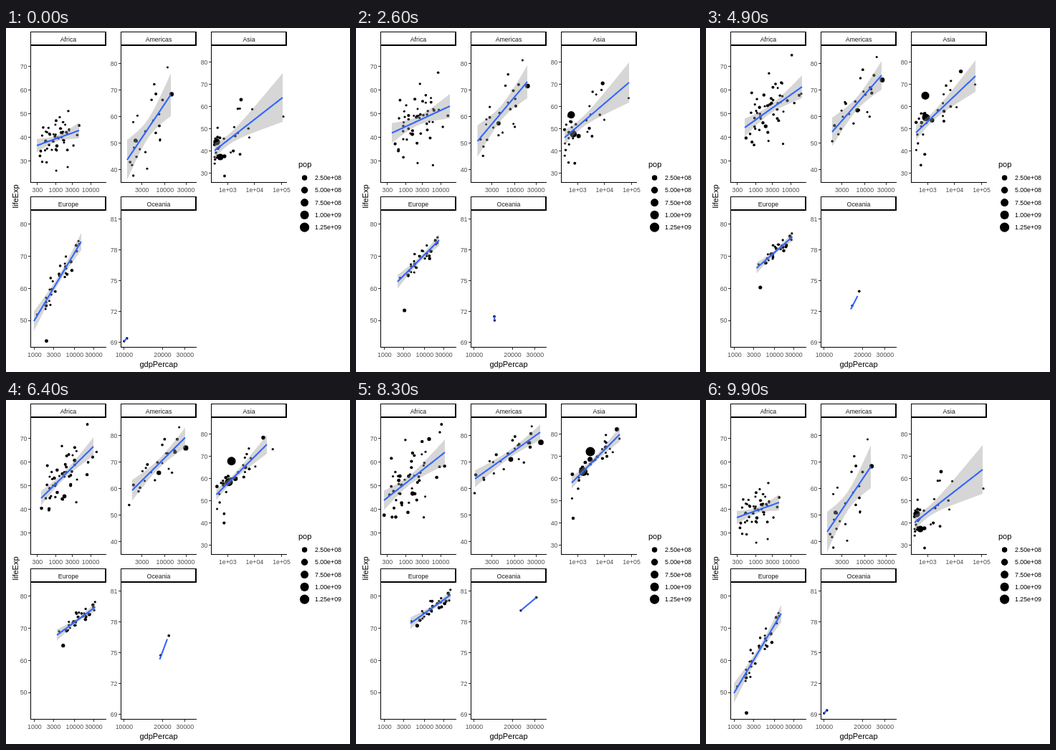
Recreate the animation shown at these times as an HTML page with a canvas. Size 480 px wide and 480 px high, loop 10 s.

```html
<!DOCTYPE html>
<html lang="en">
<head>
<meta charset="utf-8">
<title>Life expectancy and income</title>
<style>
  html, body { margin: 0; width: 100%; height: 100%; overflow: hidden; background: #fff; }
  canvas { display: block; }
</style>
</head>
<body>
<canvas id="stage" width="480" height="480"></canvas>
<script>
const ctx = document.getElementById('stage').getContext('2d');
const FONT = '"Liberation Sans", Arial, sans-serif';
const LOOP = 10000, TICK = 100, STATES = 12;
const STARTS = [500, 1400, 2300, 3200, 4100, 4900, 5600, 6400, 7200, 8000, 8800, 9600];

// Trend lines at these states: left x, y, right x, y, half band at the right end.
const TREND_AT = [0, 3, 5, 7, 10];
const africaTrend = [
  [43, 164, 102, 143, 11], [50, 146.5, 131, 109, 17], [54, 139, 134, 82, 16],
  [49, 137, 122, 65, 13], [39, 140, 124, 73, 18]
];
const americasTrend = [
  [169, 184, 230, 93, 30], [169.5, 158, 239, 75, 23], [176, 145, 245, 66, 20],
  [176, 126, 250, 52.5, 14], [166, 110, 257, 45, 11]
];
const asiaTrend = [
  [291, 171, 386, 97, 34], [291, 153, 381, 76, 28], [293, 146, 376, 67, 22],
  [293.5, 132, 364, 62, 13], [301, 115.5, 368, 48, 10]
];
const europeTrend = [
  [39, 409, 105, 298, 12], [58, 354, 116, 296, 8], [70.5, 335, 120.5, 291.5, 6],
  [71, 328, 124.5, 289, 6], [76, 311.5, 132, 272, 6]
];
const oceaniaTrend = [
  [164.8, 437, 168.7, 433, 0], [193.4, 408, 193, 402.5, 0], [202, 392.5, 211.5, 374, 0],
  [214.5, 362, 225, 333.6, 0], [230, 293.7, 251.6, 275.6, 0]
];

// Countries that stand out: population in millions, then x, y at these states.
const LEAD_AT = [0, 5, 10];
const africaLeads = [
  [44, 102, 136, 113.5, 101, 112.6, 108], [6, 88, 143, 134, 95, 117, 45],
  [135, 71, 164.5, 83.6, 137.5, 79, 130.6], [80, 77, 146, 90.7, 108.6, 102, 54.4]
];
const americasLeads = [
  [301, 231, 92.4, 245, 73.5, 258, 59], [190, 180.7, 157, 211, 117, 216, 82.8],
  [8, 177.7, 206, 177, 160, 165.5, 130]
];
const asiaLeads = [
  [1319, 294, 159, 304.5, 96, 327, 72], [1110, 299, 180, 306, 126.5, 317, 100],
  [224, 304.7, 179, 314.6, 132, 326.6, 82.8], [127, 328, 100, 355, 62, 364, 41],
  [2.5, 387, 123.5, 376, 80.6, 367.5, 54], [14, 293, 174, 299, 197, 311, 112],
  [32, 305, 206.5, 305.4, 177, 303, 165]
];
const europeLeads = [[71, 56.5, 436.7, 75.1, 365.4, 85.4, 314.8]];

// x: first tick px, px per decade; y: [first value, step, count, first px, px per step].
// skew places dots along the trend at the first and last state, scatter scales their distance to it.
const panels = [
  {
    title: 'Africa', left: 34, top: 5, x: [43.9, 48.7], xTicks: ['300', '1000', '3000', '10000'],
    y: [30, 10, 5, 185.2, 32.86], trend: africaTrend, leads: africaLeads,
    count: 48, growth: 0.26, skew: [1.1, 1.3], scatter: 1.2
  },
  {
    title: 'Americas', left: 160, top: 5, x: [189.7, 61.4], xTicks: ['3000', '10000', '30000'],
    y: [40, 10, 5, 197.2, 36.9], trend: americasTrend, leads: americasLeads,
    count: 22, growth: 0.42, skew: [1.2, 0.9], scatter: 0.95
  },
  {
    title: 'Asia', left: 286, top: 5, x: [309.3, 37.6], xTicks: ['1e+03', '1e+04', '1e+05'],
    y: [30, 10, 6, 202.9, 31.1], trend: asiaTrend, leads: asiaLeads,
    count: 26, growth: 0.38, skew: [3, 0.9], scatter: 0.95
  },
  {
    title: 'Europe', left: 34, top: 235, x: [39.9, 55.9], xTicks: ['1000', '3000', '10000', '30000'],
    y: [50, 10, 4, 408, 44.8], trend: europeTrend, leads: europeLeads,
    count: 29, growth: 0.75, skew: [0.8, 0.6], scatter: 0.65
  },
  {
    title: 'Oceania', left: 160, top: 235, x: [164.9, 178], xTicks: ['10000', '20000', '30000'],
    y: [69, 3, 5, 438.5, 43], trend: oceaniaTrend, leads: [], count: 0, growth: 0.5
  }
];

const lerp = (a, b, k) => a + (b - a) * k;
const clamp = (v, lo, hi) => Math.max(lo, Math.min(hi, v));
const sum = list => list.reduce((a, b) => a + b, 0);
const radius = millions => 0.375 * (2.845 * (1 + 5 * Math.sqrt(millions / 1319)) + 0.945);

// Value of a row of keys at state s, continued past the last key.
function along(times, rows, s) {
  let i = 0;
  while (i < times.length - 2 && s > times[i + 1]) i++;
  const k = (s - times[i]) / (times[i + 1] - times[i]);
  return rows[i].map((v, j) => lerp(v, rows[i + 1][j], k));
}

function randomFrom(seed) {
  return () => {
    seed = (seed * 16807) % 2147483647;
    return seed / 2147483647;
  };
}

panels.forEach((p, n) => {
  const rnd = randomFrom(4177 + n * 911);
  const noise = () => rnd() + rnd() + rnd() - 1.5;
  p.crowd = Array.from({ length: p.count }, () => {
    const u = lerp(rnd(), rnd(), 0.3), z = noise();
    return {
      u: [u, clamp(u + noise() * 0.2, 0, 1)],
      z: [z, 0.6 * z + 0.8 * noise()],
      pop: 0.5 + 60 * rnd() ** 3
    };
  });
});

function stateOf(p, s) {
  const k = s / (STATES - 1), grow = p.growth ** (1 - k);
  const [x1, y1, x2, y2, edge] = along(TREND_AT, p.trend, s);
  const at = u => ({ x: lerp(x1, x2, u), y: lerp(y1, y2, u) });
  const pts = p.leads.map(([pop, ...path]) => {
    const keys = LEAD_AT.map((_, i) => path.slice(i * 2, i * 2 + 2));
    const [x, y] = along(LEAD_AT, keys, s);
    return { x, y, r: radius(pop * grow) };
  });
  let bandAt = () => 0;

  if (p.count) {
    const n = p.count;
    const skew = lerp(p.skew[0], p.skew[1], k);
    const us = p.crowd.map(c => lerp(c.u[0], c.u[1], k) ** skew);
    const mean = sum(us) / n;
    const suu = sum(us.map(u => (u - mean) ** 2));
    const lever = u => Math.sqrt(1 / n + (u - mean) ** 2 / suu);
    const scale = edge / lever(1);
    bandAt = u => scale * lever(u);

    // Take mean and slope out of the noise, so the trend stays the best fit.
    const zs = p.crowd.map(c => lerp(c.z[0], c.z[1], k));
    const zMean = sum(zs) / n;
    const slope = sum(zs.map((z, i) => z * (us[i] - mean))) / suu;
    const rest = zs.map((z, i) => z - zMean - slope * (us[i] - mean));
    const unit = scale / 2.04 * p.scatter / Math.sqrt(sum(rest.map(z => z * z)) / n);
    p.crowd.forEach((c, i) => {
      const q = at(us[i]);
      const y = clamp(q.y + rest[i] * unit, p.top + 29, p.top + 202);
      pts.push({ x: q.x, y, r: radius(c.pop * grow) });
    });
  } else {
    pts.push({ x: x1, y: y1, r: radius(4) }, { x: x2, y: y2, r: radius(9) });
  }

  const line = Array.from({ length: 41 }, (_, i) => ({ ...at(i / 40), band: bandAt(i / 40) }));
  return { pts, line };
}

const states = Array.from({ length: STATES }, (_, s) => panels.map(p => stateOf(p, s)));

function text(str, x, y, size, color, align = 'center') {
  ctx.font = `${size}px ${FONT}`;
  ctx.fillStyle = color;
  ctx.textAlign = align;
  ctx.fillText(str, x, y);
}

function rect(x, y, w, h, color) {
  ctx.fillStyle = color;
  ctx.fillRect(Math.floor(x), Math.floor(y), w, h);
}

function dot(x, y, r) {
  ctx.beginPath();
  ctx.arc(x, y, r, 0, 2 * Math.PI);
  ctx.fill();
}

function drawFrame(p) {
  const { left, top } = p, bottom = top + 210;
  rect(left, top, 106, 20, '#000');
  rect(left + 1, top + 1, 103, 17, '#fff');
  rect(left, top + 20, 1, 191, '#000');
  rect(left, bottom, 106, 1, '#000');
  text(p.title, left + 53, top + 14, 8.8, '#1a1a1a');
  const [first, step, count, y0, gap] = p.y;
  for (let i = 0; i < count; i++) {
    const y = y0 - i * gap;
    rect(left - 3, y, 3, 1, '#333');
    text(first + i * step, left - 4.5, y + 3.4, 8.8, '#4d4d4d', 'right');
  }
  for (const label of p.xTicks) {
    const x = p.x[0] + p.x[1] * Math.log10(label / p.xTicks[0]);
    rect(x, bottom + 1, 1, 3, '#333');
    text(label, x, bottom + 13.5, 8.8, '#4d4d4d');
  }
}

function drawData(a, b, move, bend) {
  ctx.fillStyle = '#000';
  a.pts.forEach((q, i) => {
    const e = b.pts[i];
    dot(lerp(q.x, e.x, move), lerp(q.y, e.y, move), lerp(q.r, e.r, move));
  });
  const line = a.line.map((q, i) => {
    const e = b.line[i];
    return { x: lerp(q.x, e.x, bend), y: lerp(q.y, e.y, bend), band: lerp(q.band, e.band, bend) };
  });
  ctx.beginPath();
  line.forEach(q => ctx.lineTo(q.x, q.y - q.band));
  line.slice().reverse().forEach(q => ctx.lineTo(q.x, q.y + q.band));
  ctx.fillStyle = 'rgba(153,153,153,0.4)';
  ctx.fill();
  ctx.beginPath();
  line.forEach(q => ctx.lineTo(q.x, q.y));
  ctx.strokeStyle = '#3366ff';
  ctx.lineWidth = 2.1;
  ctx.stroke();
}

function drawLabels() {
  text('gdpPercap', 213, 473, 11, '#000');
  ctx.save();
  ctx.translate(17, 235);
  ctx.rotate(-Math.PI / 2);
  text('lifeExp', 0, 0, 11, '#000');
  ctx.restore();
  text('pop', 408, 194, 11, '#000', 'left');
  ['2.50e+08', '5.00e+08', '7.50e+08', '1.00e+09', '1.25e+09'].forEach((label, i) => {
    const y = 209 + i * 17.28;
    ctx.fillStyle = '#000';
    dot(416.6, y, radius(250 * (i + 1)));
    text(label, 431, y + 3.2, 8.8, '#000', 'left');
  });
}

function draw(time) {
  const t = Math.floor((time % LOOP) / TICK) * TICK;
  const i = STARTS.filter(start => start <= t).length - 1;
  let move = 1, bend = 1;
  if (i >= 0) {
    const steps = i === 5 ? 3 : 4;
    const k = Math.min((t - STARTS[i]) / TICK + 1, steps);
    move = k / steps;
    bend = (k - 1) / (steps - 1); // the fitted line sets off one step later
  }
  const from = states[Math.max(i, 0)], to = states[(i + 1) % STATES];
  rect(0, 0, 480, 480, '#fff');
  panels.forEach((p, n) => {
    drawFrame(p);
    drawData(from[n], to[n], move, bend);
  });
  drawLabels();
}

const begin = performance.now();
function loop() {
  draw(performance.now() - begin);
  requestAnimationFrame(loop);
}
loop();
</script>
</body>
</html>
```
